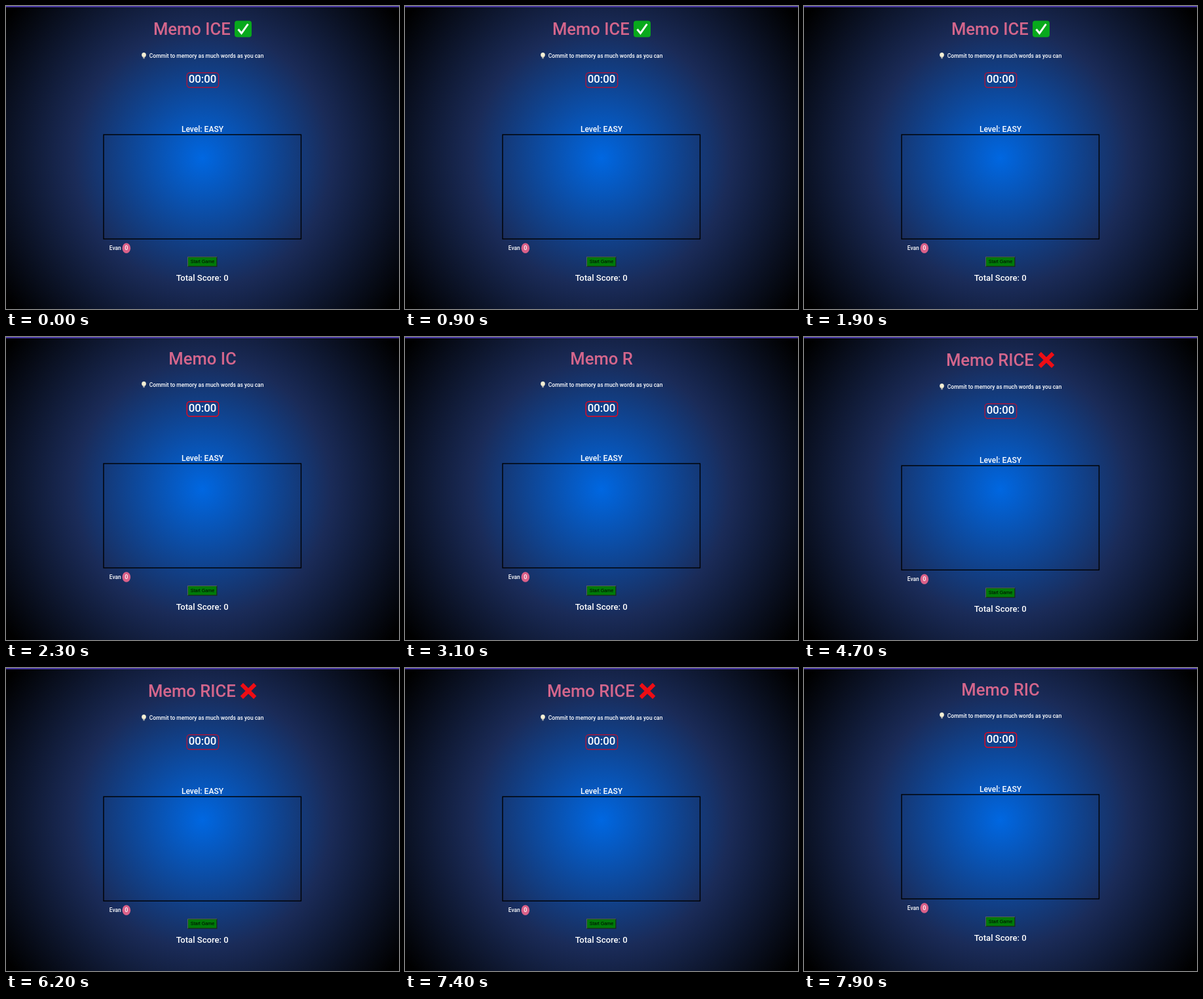
An HTML page that plays this animation: 600 by 462 pixels, repeating every 8000 ms.

```html
<!DOCTYPE html>
<html lang="en">
<head>
<meta charset="utf-8">
<title>Memo</title>
<style>
  html, body { margin: 0; width: 100%; height: 100%; overflow: hidden; }
  body {
    position: relative;
    background: radial-gradient(circle 378px at 300px 232px, #0067e1, #1a2b58 52%, #000 97%);
  }
  #stage { position: absolute; left: 0; top: 0; }
  text { font-family: Roboto, sans-serif; font-weight: 500; fill: #fff; text-anchor: middle; }
  h1 {
    position: absolute; left: 0; top: 18px; width: 600px; margin: 0;
    font: 500 25.6px/30px Roboto, sans-serif;
    color: #d4668c; text-align: center;
  }
  h1 svg { vertical-align: -3.5px; }
</style>
</head>
<body>
<svg id="stage" width="600" height="462">
  <rect width="600" height="2" fill="#4636a0"/>
  <g id="content">
    <ellipse cx="210.5" cy="71.3" rx="3.3" ry="3.5" fill="#f6f0d4"/>
    <path d="M208.6 73.5h3.8l-.7 2.5h-2.4z" fill="#d8d4c0"/>
    <rect x="209.2" y="75.2" width="2.6" height="2" fill="#8d96a4"/>
    <text x="306" y="75.7" font-size="8.45">Commit to memory as much words as you can</text>

    <rect id="timer" x="276.2" y="98.5" width="48.4" height="22.5" rx="4.5" fill="none" stroke-width="1.4"/>
    <text x="300" y="114" font-size="16.8">00:00</text>

    <text x="300" y="189.3" font-size="12.1">Level: EASY</text>
    <rect x="149" y="193" width="301.5" height="159" fill="none" stroke="#000" stroke-width="1.4"/>

    <text x="166.8" y="369" font-size="8.4">Evan</text>
    <ellipse cx="183.8" cy="366" rx="6.3" ry="7.8" fill="#db6189"/>
    <text x="183.8" y="369.1" font-size="9">0</text>

    <rect x="277" y="379" width="45.5" height="15.5" fill="#1b241d"/>
    <path d="M277 394.5V379h45.5l-1.2 1.2h-43.1v13.1z" fill="#56625a"/>
    <rect x="278.2" y="380.2" width="43.1" height="13.1" fill="#007a08"/>
    <text x="300" y="389.3" font-size="7.1"
      style="font-family:'Liberation Sans',Arial,sans-serif;font-weight:400;fill:#000">Start Game</text>

    <text x="299.7" y="416.3" font-size="13.1">Total Score: 0</text>
  </g>
</svg>
<h1 id="title"></h1>

<script>
const LOOP = 8000, ERASE_STEP = 150, TYPE_STEP = 210;
const title = document.getElementById('title');
const content = document.getElementById('content');
const timer = document.getElementById('timer');

const icon = shapes => `<svg width="26" height="26" fill="none">${shapes}</svg>`;
const icons = {
  '✅': icon('<rect y=".5" width="26" height="25" rx="4" fill="#08a91c"/>' +
    '<path d="M5.5 13.5L10.5 19.5L20.5 5.5" stroke="#fff" stroke-width="3"/>'),
  '❌': icon('<path d="M2.8 3L23.2 23M23.2 3L2.8 23" stroke="#ee0d14" stroke-width="6"/>')
};

// Characters typed or erased since a start time
const steps = (t, start, step) => Math.max(0, Math.floor((t - start) / step) + 1);

function wordAt(t) {
  if (t < 3090) return 'ICE ✅'.slice(0, Math.max(0, 5 - steps(t, 2000, ERASE_STEP)));
  const typed = Math.min(6, steps(t, 3090, TYPE_STEP));
  return 'RICE ❌'.slice(0, typed - steps(t, 7600, ERASE_STEP));
}

let shown;
function draw() {
  const word = wordAt(performance.now() % LOOP);
  if (word !== shown) {
    shown = word;
    const marked = /[✅❌]/.test(word);
    title.innerHTML = 'Memo ' + word.replace(/[✅❌]/, mark => icons[mark]);
    // The taller icon line pushes the page down
    title.style.top = marked ? '20px' : '18px';
    content.setAttribute('transform', `translate(0 ${marked ? 3.2 : 0})`);
    timer.setAttribute('stroke', marked ? '#a8163c' : '#e8061c');
  }
  requestAnimationFrame(draw);
}
draw();
</script>
</body>
</html>
```
